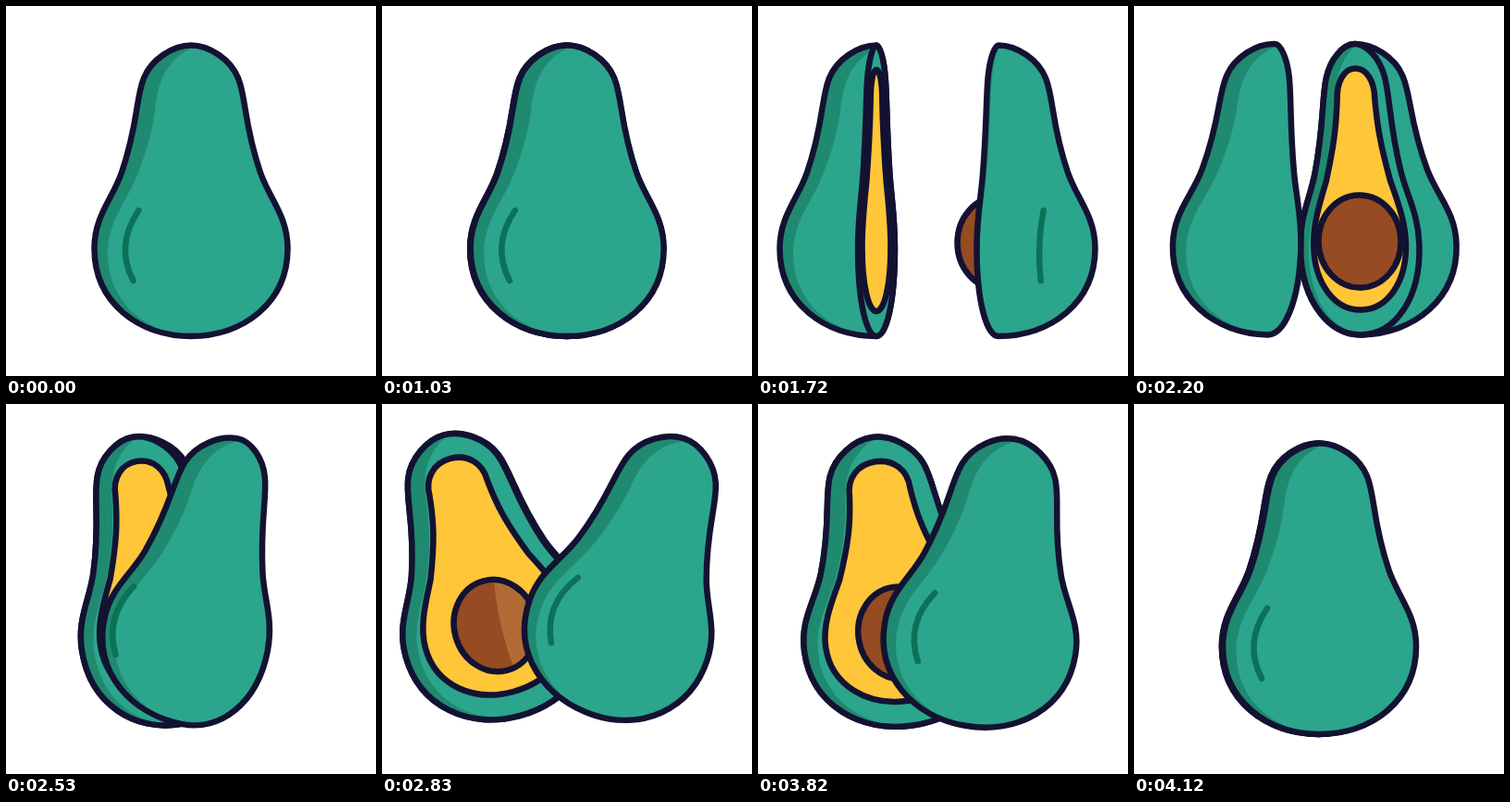
Recreate the animation shown at these times as an HTML page with a canvas. Size 400x400 px, loop 4.15 s.

```html
<!DOCTYPE html>
<html lang="en">
<head>
<meta charset="utf-8">
<title>Avocado</title>
<style>
html, body { margin: 0; width: 100%; height: 100%; overflow: hidden; background: #fff; }
canvas { display: block; width: 400px; height: 400px; }
</style>
</head>
<body>
<canvas id="stage"></canvas>
<script>
const LOOP = 4150, REST = 1030, STEP = 30;
const INK = '#131232', SKIN = '#2ca58d', SHADE = '#1f8a70', SHINE = '#0b7257';
const FLESH = '#ffc63a', SEED = '#964b22', SEED_LIGHT = '#b26a36';

const canvas = document.getElementById('stage');
const ctx = canvas.getContext('2d');
const dpr = window.devicePixelRatio || 1;
canvas.width = canvas.height = 400 * dpr;

// Right-hand profiles, top to bottom, around the fruit's own axis.
const PEAR = [[0, -157.5], [20, -157.5], [43, -142], [51, -122], [60, -100], [57, -72], [75, -20],
  [85, 9], [104.5, 27], [104.5, 62], [104.5, 121], [56, 157], [0, 157]];
const CORE = [[0, -131], [20, -131], [33, -117], [33, -98], [36, -68], [41, -48], [56, -10],
  [68, 13], [81, 35], [81, 60], [81, 102], [45, 130], [0, 130]];
const SHADOW = [[8, -158], [-22, -146], [-34, -125], [-38, -95], [-41, -65], [-50, -35], [-62, -8],
  [-76, 20], [-90, 38], [-90, 68], [-90, 110], [-62, 150], [0, 158]];

// Smooth track through [time, value] keys that never overshoots a key.
function track(...keys) {
  const rate = i => (keys[i + 1][1] - keys[i][1]) / (keys[i + 1][0] - keys[i][0]);
  const slope = keys.map((k, i) => {
    if (i === 0 || i === keys.length - 1) return 0;
    const a = rate(i - 1), b = rate(i);
    return a * b > 0 ? 2 * a * b / (a + b) : 0;
  });
  return t => {
    const last = keys.length - 1;
    if (t <= keys[0][0]) return keys[0][1];
    if (t >= keys[last][0]) return keys[last][1];
    let i = 0;
    while (t > keys[i + 1][0]) i++;
    const [t0, v0] = keys[i], [t1, v1] = keys[i + 1], h = t1 - t0, u = (t - t0) / h;
    const u2 = u * u, u3 = u2 * u;
    return v0 * (2 * u3 - 3 * u2 + 1) + slope[i] * h * (u3 - 2 * u2 + u)
      + v1 * (3 * u2 - 2 * u3) + slope[i + 1] * h * (u3 - u2);
  };
}

const hollow = {
  x: track([1000, 200], [1540, 144], [1720, 128], [1865, 124], [2100, 136], [2200, 148],
    [2830, 277.5], [3190, 301], [3550, 290], [3700, 272], [4150, 200]),
  y: track([1720, 200], [2200, 198.5], [2830, 187], [3190, 187], [3550, 189], [3700, 190.5], [4150, 200]),
  tilt: track([1900, 0], [2200, 1.5], [2830, 18], [3550, 18], [3700, 14], [4150, 0]),
  yaw: track([1000, 0], [1720, 79], [2200, 109], [2830, 160], [3190, 180])
};
const seeded = {
  x: track([1000, 200], [1540, 231], [1720, 260], [1907, 277], [2100, 257], [2200, 242.5],
    [2830, 108], [3190, 94], [3550, 103], [3700, 122], [4150, 200]),
  y: track([1720, 200], [2200, 198.5], [2830, 185.5], [3190, 185.5], [3550, 187], [3700, 189], [4150, 200]),
  tilt: track([1900, 0], [2200, -1.5], [2830, -15], [3550, -15], [3700, -11.5], [4150, 0]),
  yaw: track([1000, 0], [1720, 77], [2200, 128], [2830, 168], [3190, 180])
};
const seedEdge = track([2200, 110], [2830, 2], [3300, -50]);

const rad = deg => deg * Math.PI / 180;

function curve(path, pts) {
  for (let i = 1; i < pts.length; i += 3) {
    path.bezierCurveTo(...pts[i], ...pts[i + 1], ...pts[i + 2]);
  }
}

function outline(profile, left, right) {
  const path = new Path2D();
  path.moveTo(...profile[0]);
  curve(path, profile.map(([x, y]) => [x * right, y]));
  curve(path, profile.map(([x, y]) => [-x * left, y]).reverse());
  path.closePath();
  return path;
}

function paint(path, fill) {
  ctx.fillStyle = fill;
  ctx.fill(path);
}

function ink(path) {
  ctx.strokeStyle = INK;
  ctx.stroke(path);
}

function clipped(path, draw) {
  ctx.save();
  ctx.clip(path);
  draw();
  ctx.restore();
}

function shine(turn) {
  const lon = [-37, -43, -40].map(d => d + turn);
  if (Math.abs(lon[1]) > 85) return;
  const [x0, xm, x1] = [94, 104, 97].map((r, i) => r * Math.sin(rad(lon[i])));
  ctx.strokeStyle = SHINE;
  ctx.beginPath();
  ctx.moveTo(x0, 21);
  ctx.quadraticCurveTo(2 * xm - (x0 + x1) / 2, 59, x1, 97);
  ctx.stroke();
}

function skin(left, right, turn) {
  const body = outline(PEAR, left, right);
  paint(body, SHADE);
  clipped(body, () => {
    const pts = SHADOW.map(([x, y]) => [x * left, y]);
    const light = new Path2D();
    light.moveTo(...pts[0]);
    curve(light, pts);
    light.lineTo(130, 160);
    light.lineTo(130, -160);
    paint(light, SKIN);
    if (turn !== undefined) shine(turn);
  });
  ink(body);
}

function seed(t, rightWidth) {
  const shape = new Path2D();
  shape.ellipse(0, 56, 44.5, 50, 0, Math.PI / 2, Math.PI * 1.5);
  shape.ellipse(0, 56, 44.5 * rightWidth, 50, 0, -Math.PI / 2, Math.PI / 2);
  shape.closePath();
  paint(shape, SEED);
  clipped(shape, () => {
    const light = new Path2D();
    light.moveTo(12, 5);
    light.quadraticCurveTo(seedEdge(t), 56, 8, 107);
    light.lineTo(90, 107);
    light.lineTo(90, 5);
    paint(light, SEED_LIGHT);
  });
  ink(shape);
}

function cutFace(f) {
  skin(f, f);
  const core = outline(CORE, f, f);
  paint(core, FLESH);
  ink(core);
}

function place(half, t, draw) {
  ctx.save();
  ctx.translate(half.x(t), half.y(t));
  ctx.rotate(rad(half.tilt(t)));
  draw(half.yaw(t));
  ctx.restore();
}

function drawHollow(t) {
  place(hollow, t, yaw => {
    const c = Math.cos(rad(yaw)), f = Math.abs(c), rest = 180 - yaw;
    skin(1, f, -rest * rest / 90);
    if (c > 0) cutFace(f);
  });
}

function drawSeeded(t) {
  place(seeded, t, yaw => {
    const c = Math.cos(rad(yaw)), f = Math.abs(c);
    if (c < 0) {
      skin(f, 1, yaw * (0.7 + 0.0024 * yaw));
      cutFace(f);
      seed(t, Math.min(1, f * 1.65));
    } else {
      seed(t, 1);
      skin(f, 1, yaw * (0.7 + 0.0024 * yaw));
    }
  });
}

function render(t) {
  ctx.setTransform(dpr, 0, 0, dpr, 0, 0);
  ctx.fillStyle = '#fff';
  ctx.fillRect(0, 0, 400, 400);
  ctx.lineWidth = 6.5;
  ctx.lineCap = ctx.lineJoin = 'round';
  if (t < REST) {
    drawSeeded(0);
    return;
  }
  t = REST + Math.floor((t - REST) / STEP) * STEP;
  const order = t < 1900 ? [drawHollow, drawSeeded] : [drawSeeded, drawHollow];
  order.forEach(draw => draw(t));
}

const start = performance.now();
function tick() {
  render((performance.now() - start) % LOOP);
  requestAnimationFrame(tick);
}
tick();
</script>
</body>
</html>
```
